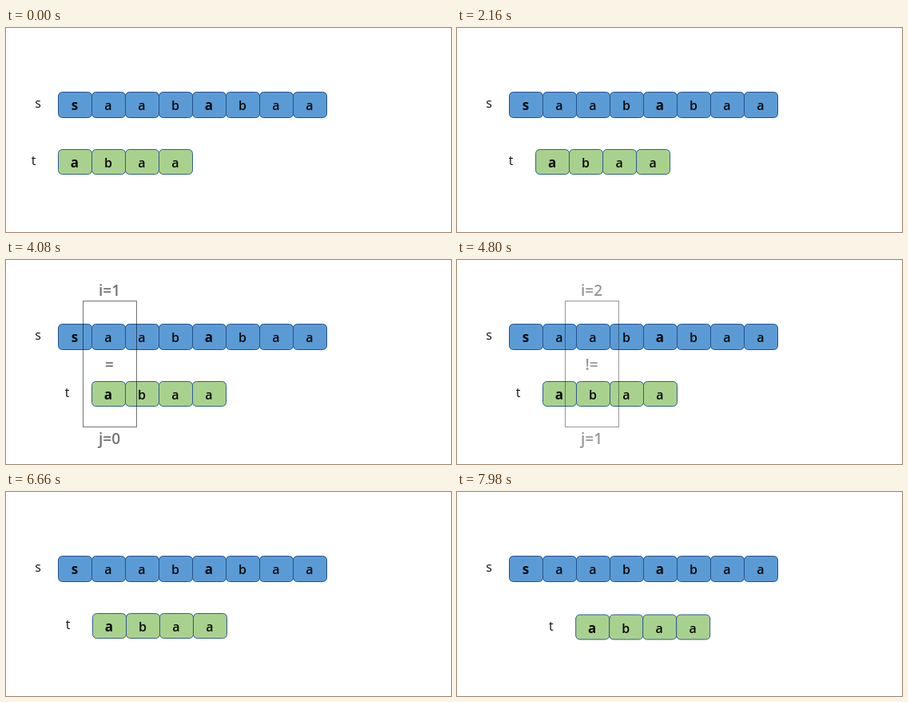
An HTML page with a canvas that plays this animation: 557x256 px, repeating every 8 s.

```html
<!DOCTYPE html>
<html lang="en">
<head>
<meta charset="utf-8">
<title>String matching</title>
<style>
  html, body { margin: 0; width: 100%; height: 100%; overflow: hidden; background: #fff; }
  canvas { display: block; }
</style>
</head>
<body>
<canvas id="stage" width="557" height="256"></canvas>
<script>
const ctx = document.getElementById('stage').getContext('2d');
const LOOP = 8000, FADE = 500, SLIDE = 1050, CELL = 42;
const FONT = '"Open Sans", "Noto Sans", sans-serif';

// Comparison windows: centre, texts, start of fade in, start of fade out
const windows = [
  { x: 86.5, i: 'i=0', op: '!=', j: 'j=0', show: 60, hide: 900 },
  { x: 130, i: 'i=1', op: '=', j: 'j=0', show: 2860, hide: 3855 },
  { x: 169, i: 'i=2', op: '!=', j: 'j=1', show: 4600, hide: 5850 }
];

// Shifts of the pattern row
const slides = [
  { start: 1431, dx: 42, dy: 0 },
  { start: 6557, dx: 41.2, dy: 1.5 }
];

const clamp = v => Math.min(1, Math.max(0, v));
const ease = u => (1 - Math.cos(Math.PI * u)) / 2;

function text(str, x, y, size, weight, color) {
  ctx.font = `${weight} ${size}px ${FONT}`;
  ctx.fillStyle = color;
  ctx.fillText(str, x, y);
}

function row(word, x, y, h, fill, stroke, heavy) {
  ctx.lineWidth = 1;
  [...word].forEach((ch, k) => {
    const left = x + k * CELL;
    ctx.beginPath();
    ctx.roundRect(left, y, CELL, h, 5);
    ctx.fillStyle = fill;
    ctx.fill();
    ctx.strokeStyle = stroke;
    ctx.stroke();
    const big = heavy.includes(k);
    text(ch, left + CELL / 2 - 0.5, y + 22.5, big ? 17 : 16, big ? 700 : 600, '#0a0a0a');
  });
}

function compare(w, t) {
  const alpha = clamp((t - w.show) / FADE) - clamp((t - w.hide) / FADE);
  if (alpha <= 0) return;
  ctx.globalAlpha = alpha;
  ctx.strokeStyle = '#000';
  ctx.lineWidth = 1;
  ctx.strokeRect(Math.floor(w.x - 34) + 0.5, 51.5, 67, 158);
  text(w.i, w.x - 0.5, 44.5, 19, 600, '#000');
  text(w.op, w.x - 0.5, 137.5, 19, 600, '#000');
  text(w.j, w.x - 0.5, 230.5, 19, 600, '#000');
  ctx.globalAlpha = 1;
}

function draw(t) {
  ctx.fillStyle = '#fff';
  ctx.fillRect(0, 0, 557, 256);
  ctx.textAlign = 'center';

  let dx = 0, dy = 0;
  for (const s of slides) {
    const u = ease(clamp((t - s.start) / SLIDE));
    dx += s.dx * u;
    dy += s.dy * u;
  }

  text('s', 40, 100, 16, 400, '#111');
  row('saababaa', 65.5, 80.5, 32, '#5b9bd5', '#24508f', [0, 4]);
  text('t', 34.5 + dx, 172 + dy, 16, 400, '#111');
  row('abaa', 65.5 + dx, 152.5 + dy, 31, '#a9d18e', '#2f5b93', [0]);
  windows.forEach(w => compare(w, t));
}

function tick() {
  draw(performance.now() % LOOP);
  requestAnimationFrame(tick);
}
tick();
</script>
</body>
</html>
```
